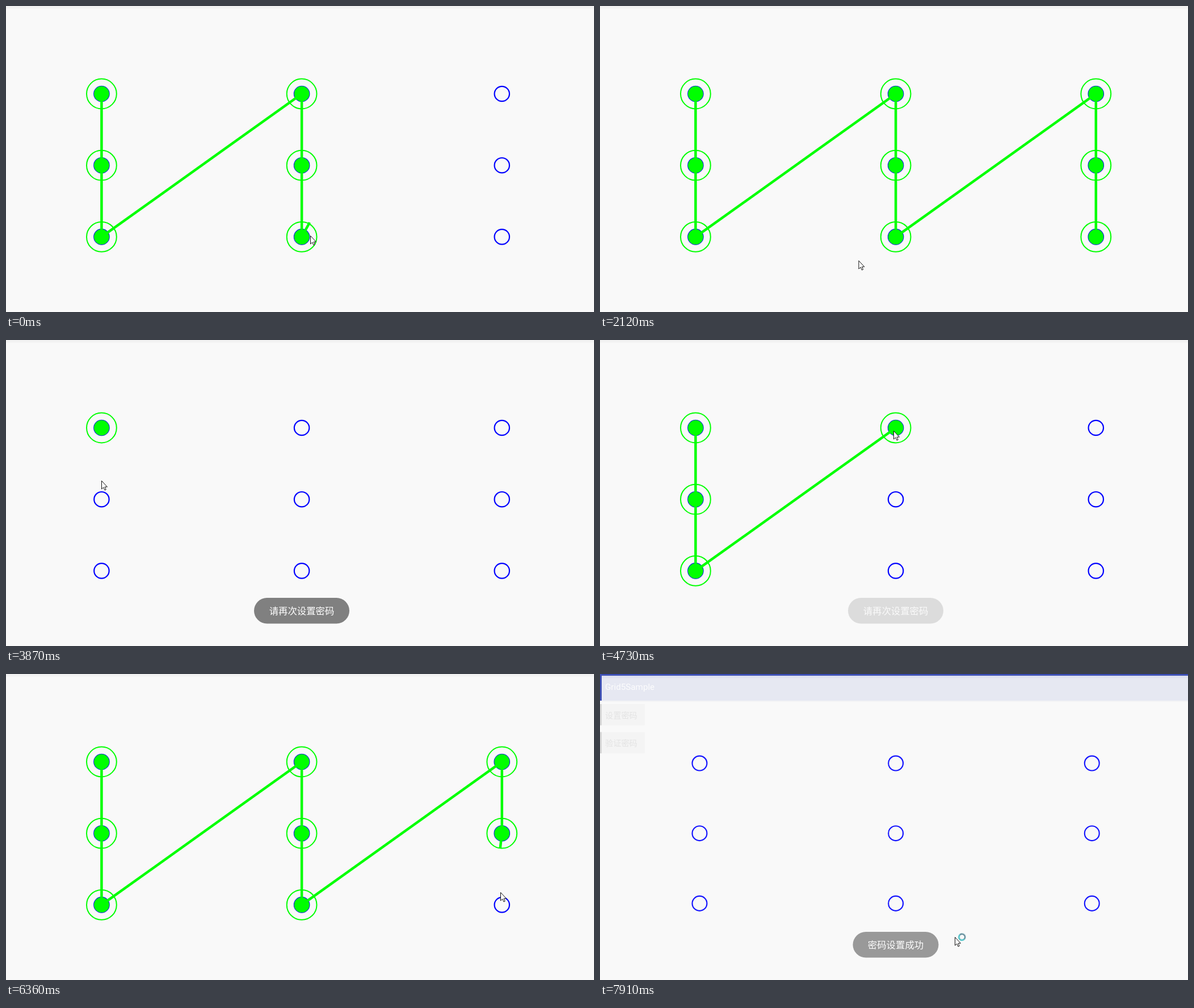
An HTML page that plays this animation: 1036x540 px, repeating every 8 s.

```html
<!DOCTYPE html>
<html lang="zh">
<head>
<meta charset="utf-8">
<title>Pattern lock</title>
<style>
  html, body { margin: 0; width: 100%; height: 100%; overflow: hidden; background: #f9f9f9; }
  svg { display: block; width: 1036px; height: 540px; }
  text { font-family: "Noto Sans CJK SC", "Noto Sans CJK", Roboto, sans-serif; }
  .dot { fill: none; stroke: #00f; stroke-width: 2.2; }
  .core { fill: #0f0; }
  .ring { fill: none; stroke: #0f0; stroke-width: 2; }
  #path { fill: none; stroke: #0f0; stroke-width: 4.5; }
  #toast text { font-size: 16.4px; fill: #fff; text-anchor: middle; }
  #menu .title { font: 15.2px Roboto, sans-serif; fill: #fcfcfd; }
  #menu .label { font-size: 14.2px; fill: #e3e3e3; }
</style>
</head>
<body>
<svg viewBox="0 0 1036 540">
  <linearGradient id="shade" x2="0" y2="1">
    <stop stop-color="#d8dbec"/>
    <stop offset=".12" stop-color="#e6e8f2"/>
  </linearGradient>
  <rect width="1036" height="540" fill="#f9f9f9"/>
  <rect id="strip" width="1036" height="4.5" fill="#f2f2f2"/>
  <g id="menu">
    <rect width="1036" height="49" fill="#f3f3f5"/>
    <rect width="1036" height="47" fill="#3f51b5"/>
    <rect x="3" y="3" width="1033" height="44" fill="url(#shade)"/>
    <text class="title" x="9" y="28">Grid5Sample</text>
    <g id="button">
      <rect y="53" width="79" height="37.5" fill="#f4f4f4"/>
      <rect y="53" width="3" height="37.5" fill="#d6d6d6"/>
    </g>
    <use href="#button" y="49.5"/>
    <text class="label" x="9" y="77.5">设置密码</text>
    <text class="label" x="9" y="127">验证密码</text>
  </g>
  <g id="lock">
    <g id="dots"></g>
    <path id="path"/>
  </g>
  <g id="toast">
    <rect y="455" height="45.5" rx="22.75" fill="#808080"/>
    <text x="521" y="484.2"></text>
  </g>
  <g id="cursor">
    <path d="M.5.5V15L3.8 12 6 17 8.2 16 6.1 11.2H10.4Z" fill="#fff" stroke="#111"/>
    <g id="busy" fill="none" stroke-width="2.2">
      <circle cx="13" r="5.4" stroke="#c3dfe4" stroke-width="3.6"/>
      <path d="M9.2 -3.8A5.4 5.4 0 1 0 16.8 3.8" stroke="#4cc4c8"/>
      <path d="M9.2 -3.8A5.4 5.4 0 0 1 16.8 3.8" stroke="#6b8d9b"/>
    </g>
  </g>
</svg>
<script>
// The picture changes once per beat; all times below are in beats.
const LOOP = 8000, BEAT = 155;
const CLEAR_1 = 15.6, PRESS = 23, FADE_END = 30.6, BUSY = 47, CLEAR_2 = 49.95, LEAVE = 51;
const REACH = 36;

// Turning points of the pointer: beat, x, y.
const route = [
  [-1, 535, 382], [0, 536, 405], [2, 545, 395], [6, 874, 154], [7, 900, 290], [9, 885, 425],
  [14, 348, 455], [17, 348, 455], [21, 168, 152], [23, 168, 152], [26, 168, 440], [27, 172, 415],
  [29, 514, 160], [30, 517, 160], [34, 528, 420], [36, 702, 273], [38, 870, 154], [41, 871, 385],
  [43, 871, 389], [45, 750, 470], [47, 625, 464]
];

const $ = id => document.getElementById(id);
const clamp = v => Math.max(0, Math.min(1, v));
const show = (el, on) => el.style.display = on ? "" : "none";

const points = Array.from({ length: 9 }, (_, i) =>
  [168.4 + 352.7 * Math.floor(i / 3), 155 + 126.2 * (i % 3)]);

function circle(name, [cx, cy], r) {
  const el = document.createElementNS("http://www.w3.org/2000/svg", "circle");
  for (const [key, value] of Object.entries({ class: name, cx, cy, r })) el.setAttribute(key, value);
  return $("dots").appendChild(el);
}

const marks = points.map(p => {
  circle("dot", p, 13.2);
  return [circle("core", p, 13.4), circle("ring", p, 26.4)];
});

function pointer(beat) {
  const i = route.findIndex(key => key[0] > beat);
  if (i < 0) return route.at(-1).slice(1);
  const [t0, x0, y0] = route[i - 1], [t1, x1, y1] = route[i];
  const f = (beat - t0) / (t1 - t0);
  return [x0 + (x1 - x0) * f, y0 + (y1 - y0) * f];
}

// The drawn line trails the pointer by one beat.
const tail = beat => pointer(beat - 1);

// A dot joins the pattern when the tail comes within reach of it.
function picked(beat) {
  if (beat >= CLEAR_2 || (beat >= CLEAR_1 && beat < PRESS)) return 0;
  const again = beat >= PRESS;
  let count = again ? 1 : 6;
  for (let b = again ? PRESS : 0; b <= beat && count < 9; b++) {
    const [x, y] = tail(b), [px, py] = points[count];
    if (Math.hypot(x - px, y - py) < REACH) count++;
  }
  return count;
}

function drawToast(beat) {
  const done = beat >= CLEAR_2;
  const width = done ? 151 : 168;
  const fadeIn = clamp((beat - (done ? CLEAR_2 : CLEAR_1)) / 1.33);
  const fadeOut = done ? 1 : clamp((FADE_END - beat) / 2.6);
  const [pill, label] = $("toast").children;
  pill.setAttribute("x", 521 - width / 2);
  pill.setAttribute("width", width);
  label.textContent = done ? "密码设置成功" : "请再次设置密码";
  $("toast").setAttribute("opacity", fadeIn * fadeOut);
}

function draw(beat) {
  const count = picked(beat);
  marks.forEach((pair, i) => pair.forEach(el => show(el, i < count)));
  const line = points.slice(0, count);
  if (count > 0 && count < 9) line.push(tail(beat));
  $("path").setAttribute("d", line.length ? "M" + line.join("L") : "");

  const leaving = beat >= LEAVE;
  show($("menu"), leaving);
  show($("strip"), !leaving);
  $("lock").setAttribute("opacity", leaving ? 0.92 : 1);
  $("lock").setAttribute("transform", leaving
    ? "translate(521 281.2) scale(.98) translate(-521 -281.2)" : "");

  drawToast(beat);
  $("cursor").setAttribute("transform", `translate(${pointer(beat)})`);
  show($("busy"), beat >= BUSY);
}

const begin = performance.now();
function tick() {
  draw(Math.floor((performance.now() - begin) % LOOP / BEAT));
  requestAnimationFrame(tick);
}
tick();
</script>
</body>
</html>
```
